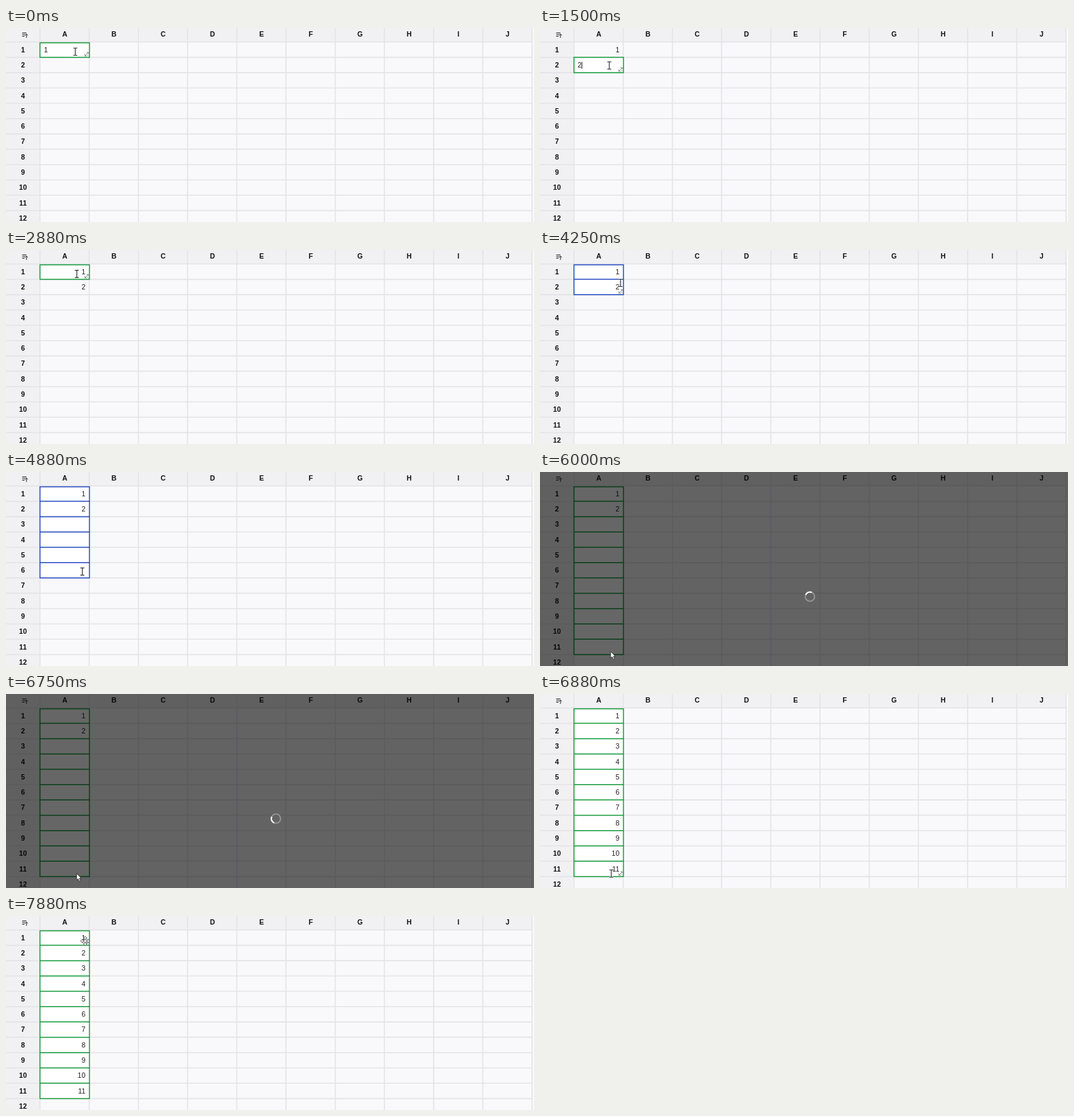
Write an HTML page with a canvas that moves like this. It is 800 px wide and 295 px high and loops after 8 s.

```html
<!DOCTYPE html>
<html lang="en">
<head>
<meta charset="utf-8">
<title>Spreadsheet autofill</title>
<style>
html, body { margin: 0; width: 800px; height: 295px; overflow: hidden; background: #f9f9fc; }
canvas { display: block; }
</style>
</head>
<body>
<canvas id="stage" width="800" height="295"></canvas>
<script>
const ctx = document.getElementById('stage').getContext('2d');
const LOOP = 8000, STEP = 125;
const FONT = '"Liberation Sans", Arial, sans-serif';
const LEFT = 51.5, COL = 74.55, ROW = 23.3;
const GREEN = '#149a3c', BLUE = '#2449bf';
const colX = i => LEFT + COL * i;
const rowY = i => 21.3 + ROW * i;
const midY = row => rowY(row - 0.5) + 0.8;

// Pointer path: time, x, y
const path = [
  [0, 105, 36], [250, 105, 36], [750, 105, 57], [1875, 105, 57],
  [2375, 105, 36], [2750, 105, 36], [3500, 119, 38], [4000, 120, 38],
  [4250, 122, 50], [5625, 108, 273], [7125, 108, 273], [7875, 120, 38]
];

function pointerAt(t) {
  const i = path.findIndex(p => p[0] > t);
  if (i < 0) return path[path.length - 1].slice(1);
  const [t0, x0, y0] = path[i - 1], [t1, x1, y1] = path[i];
  const u = (t - t0) / (t1 - t0);
  return [x0 + (x1 - x0) * u, y0 + (y1 - y0) * u];
}

function text(s, x, y, align, weight = '') {
  ctx.font = `${weight} 10.6px ${FONT}`;
  ctx.textAlign = align;
  ctx.textBaseline = 'middle';
  ctx.fillText(s, x, y);
}

function line(points, color, width) {
  ctx.beginPath();
  points.forEach(([x, y]) => ctx.lineTo(x, y));
  ctx.strokeStyle = color;
  ctx.lineWidth = width;
  ctx.stroke();
}

function drawGrid() {
  ctx.fillStyle = '#f9f9fc';
  ctx.fillRect(0, 0, 800, 295);
  ctx.fillStyle = '#f1f1f4';
  ctx.fillRect(0, 0, 797, 21);
  ctx.fillRect(0, 0, 51, 295);
  for (let i = 0; i <= 10; i++) line([[colX(i), 0], [colX(i), 295]], '#e4e4e8', 1.6);
  for (let i = 0; i < 12; i++) line([[0, rowY(i)], [797, rowY(i)]], '#e4e4e8', 1.6);
  ctx.fillStyle = '#111';
  for (let i = 0; i < 10; i++) text('ABCDEFGHIJ'[i], colX(i + 0.5) + 0.3, 10.5, 'center', 'bold');
  for (let r = 1; r <= 12; r++) text(r, 25.7, midY(r), 'center', 'bold');
  // Sort icon
  [[7.5, 31], [10, 29], [12.5, 28]].forEach(([y, x]) => line([[24.5, y], [x, y]], '#222', 1));
  line([[31, 15], [31, 9]], '#222', 1);
  line([[29, 11.3], [31, 9.2], [33, 11.3]], '#222', 1);
}

function drawSelection(from, to, color) {
  const top = Math.max(22.5, rowY(from - 1)), bottom = rowY(to);
  ctx.fillStyle = '#fff';
  ctx.fillRect(LEFT, top, COL + 0.4, bottom - top);
  ctx.strokeStyle = color;
  ctx.lineWidth = 1.5;
  ctx.strokeRect(LEFT, top, COL + 0.4, bottom - top);
  for (let r = from; r < to; r++) line([[LEFT, rowY(r)], [126.4, rowY(r)]], color, 1.5);
}

function drawHandle(row) {
  const y = rowY(row) - 5;
  line([[119.5, y + 3], [125, y - 2.5]], '#777', 0.9);
  line([[122, y - 2.5], [125, y - 2.5], [125, y]], '#777', 0.8);
  line([[119.5, y], [119.5, y + 3], [122.5, y + 3]], '#777', 0.8);
  line([[123, y + 1], [125, y + 3]], '#777', 0.8);
}

function drawBeam() {
  const shape = () => {
    ctx.beginPath();
    ctx.moveTo(-3, -5.5); ctx.lineTo(3, -5.5);
    ctx.moveTo(0, -5.5); ctx.lineTo(0, 5.5);
    ctx.moveTo(-3, 5.5); ctx.lineTo(3, 5.5);
    ctx.stroke();
  };
  ctx.strokeStyle = '#fff'; ctx.lineWidth = 2.4; shape();
  ctx.strokeStyle = '#333'; ctx.lineWidth = 1.2; shape();
}

function outlined(points, width, color) {
  ctx.beginPath();
  points.forEach(([x, y]) => ctx.lineTo(x, y));
  ctx.closePath();
  ctx.fillStyle = '#fff';
  ctx.fill();
  ctx.strokeStyle = color;
  ctx.lineWidth = width;
  ctx.stroke();
}

function drawMove() {
  const points = [];
  const arm = [[-1, -1], [-1, -4], [-3, -4], [0, -7], [3, -4], [1, -4]];
  for (let k = 0; k < 4; k++) {
    const c = [1, 0, -1, 0][k], s = [0, 1, 0, -1][k];
    arm.forEach(([x, y]) => points.push([x * c - y * s, x * s + y * c]));
  }
  outlined(points, 0.9, '#555');
}

function drawArrow() {
  outlined([[-1, 0], [-1, 10], [1.3, 8], [3, 11.7], [4.8, 10.9], [3.2, 7.2], [6.2, 7.2]], 0.8, '#222');
}

function drawSpinner(t) {
  const ring = (a, b, color) => {
    ctx.beginPath();
    ctx.arc(409, 189.5, 7, a, b);
    ctx.strokeStyle = color;
    ctx.lineWidth = 2;
    ctx.stroke();
  };
  const start = -2.75 + (t - 6000) / 1000 * 2 * Math.PI;
  ctx.fillStyle = 'rgba(0,0,0,.6)';
  ctx.fillRect(0, 0, 800, 295);
  ring(0, 2 * Math.PI, '#929293');
  ring(start, start + 1.6, '#fff');
}

function draw(t) {
  const [x, y] = pointerAt(t);
  const hover = Math.floor((y - 21.3) / ROW) + 1;
  const dragging = t >= 4000 && t < 6000;
  const loading = t >= 6000 && t < 6875;
  const editing = t < 625 ? 1 : t >= 1000 && t < 2250 ? 2 : 0;
  const first = t >= 625 && t < 2250 ? 2 : 1;
  const last = t < 4000 ? first : dragging ? hover : 11;
  const filled = t < 2250 ? (t < 625 ? 0 : 1) : t < 6875 ? 2 : 11;

  drawGrid();
  drawSelection(first, last, dragging ? BLUE : GREEN);
  ctx.fillStyle = '#222';
  for (let r = 1; r <= filled; r++) text(r, 120.3, midY(r), 'right');
  if (editing) {
    const typed = editing === 1 || t >= 1500;
    const left = editing === 1 ? 57.5 : 57;
    if (typed) text(editing, left, midY(editing), 'left');
    if (t >= 125 && Math.floor(t / 500) % 2 === editing % 2 - 0 || t >= 1500 && t < 2000) {
      const cx = typed ? left + 6.5 : left;
      line([[cx, midY(editing) - 5.5], [cx, midY(editing) + 5]], '#222', 1);
    }
  }
  if (!loading && !(dragging && hover > 2)) drawHandle(hover);
  if (loading) drawSpinner(t);

  ctx.save();
  ctx.translate(x, y);
  const onHandle = !dragging && Math.hypot(x - 122, y - 40) < 5;
  (loading ? drawArrow : onHandle ? drawMove : drawBeam)();
  ctx.restore();
}

function tick() {
  const t = performance.now() % LOOP;
  draw(Math.floor(t / STEP) * STEP);
  requestAnimationFrame(tick);
}
tick();
</script>
</body>
</html>
```
